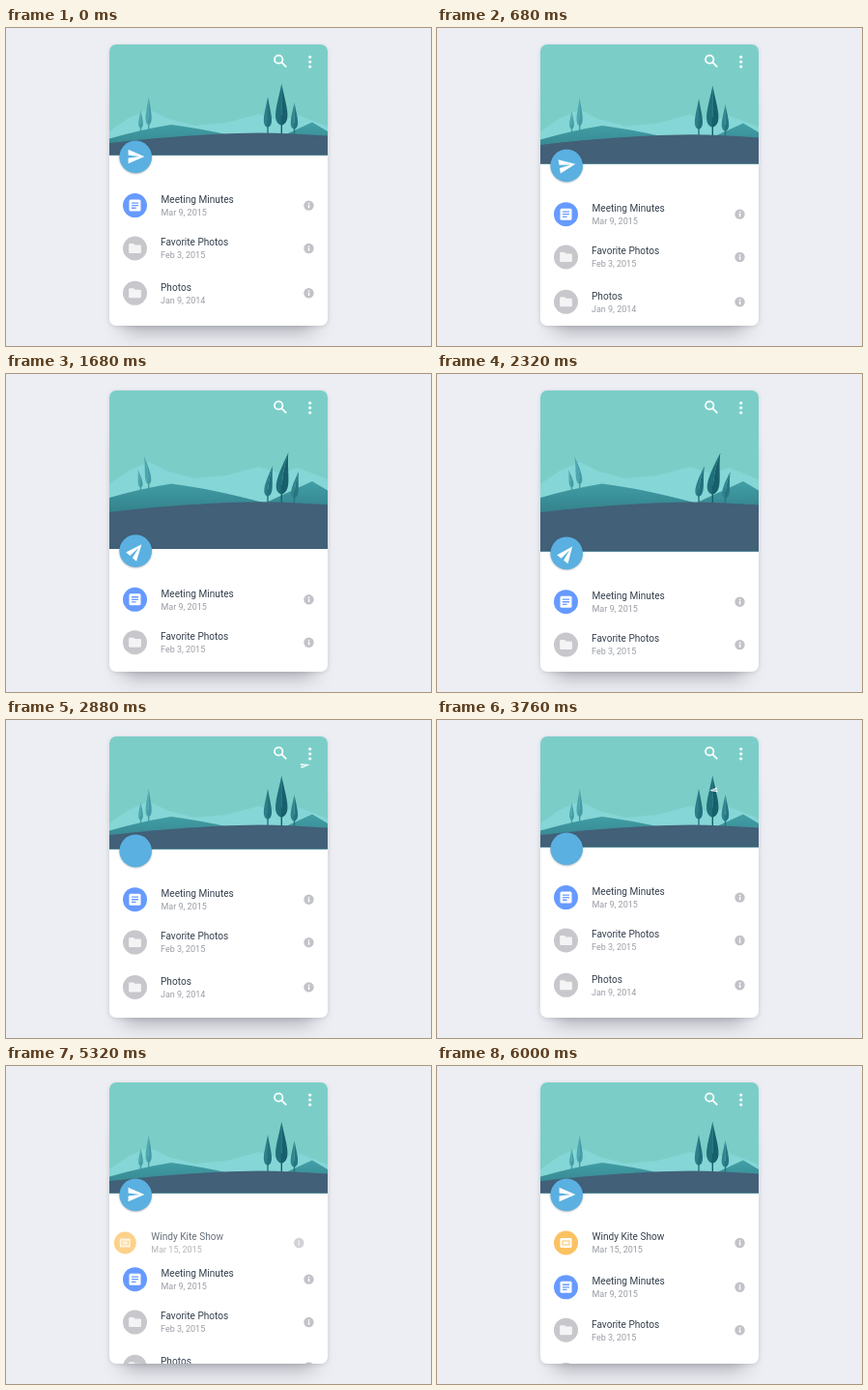
An HTML page with a canvas for the animation above (7000 ms loop, 440 px wide and 329 px high).

```html
<!DOCTYPE html>
<html lang="en">
<head>
<meta charset="utf-8">
<title>Pull to refresh</title>
<style>
html, body { margin: 0; width: 100%; height: 100%; overflow: hidden; background: #edeef3; }
canvas { display: block; width: 440px; height: 329px; }
</style>
</head>
<body>
<canvas></canvas>
<script>
const LOOP = 7000, MAX_PULL = 53.2, RELEASE = 2440;
const canvas = document.querySelector('canvas');
const ctx = canvas.getContext('2d');
const ratio = window.devicePixelRatio || 1;
canvas.width = 440 * ratio;
canvas.height = 329 * ratio;

const clamp = v => Math.max(0, Math.min(1, v));
const span = (t, from, to) => clamp((t - from) / (to - from));
const smooth = v => v * v * (3 - 2 * v);
const easeOut = v => 1 - (1 - v) ** 3;
const mix = (a, b, v) => a + (b - a) * v;

function pullAt(t) {
  if (t < 360) return 0;
  const drag = time => MAX_PULL * (1 - 1 / (1 + ((time - 360) / 545) ** 3));
  return t < RELEASE ? drag(t) : drag(RELEASE) * (1 - span(t, RELEASE, 3110)) ** 3;
}

function at(x, y, draw, scaleX = 1, scaleY = scaleX, angle = 0) {
  ctx.save();
  ctx.translate(x, y);
  ctx.rotate(angle);
  ctx.scale(scaleX, scaleY);
  draw();
  ctx.restore();
}

function disc(x, y, r, color) {
  ctx.fillStyle = color;
  ctx.beginPath();
  ctx.arc(x, y, r, 0, 7);
  ctx.fill();
}

function box(x, y, w, h, r, color) {
  ctx.fillStyle = color;
  ctx.beginPath();
  ctx.roundRect(x, y, w, h, r);
  ctx.fill();
}

function label(text, x, y, size, color) {
  ctx.font = `${size}px Roboto, sans-serif`;
  ctx.fillStyle = color;
  ctx.fillText(text, x, y);
}

function withShadow(color, y, blur, draw) {
  ctx.save();
  ctx.shadowColor = color;
  ctx.shadowOffsetY = y * ratio;
  ctx.shadowBlur = blur * ratio;
  draw();
  ctx.restore();
}

function fillPath(d, color) {
  ctx.fillStyle = color;
  ctx.fill(new Path2D(d));
}

// Landscape

function layer(d, offset, color) {
  at(0, offset, () => fillPath(d, color));
}

function tree(x, base, height, width, bend, light, dark) {
  const tip = base - height, foot = base - height * 0.16, lean = bend * height;
  const mid = mix(foot, tip, 0.5), low = mix(foot, tip, 0.08);
  const half = (side, color) => fillPath(
    `M${x + lean} ${tip} C${x + lean * 0.15 + side * width * 0.6} ${mid},
     ${x + side * width * 1.65} ${low}, ${x} ${foot}
     Q${x} ${mid} ${x + lean} ${tip}Z`, color);
  half(-1, light);
  half(1, dark);
  ctx.fillStyle = dark;
  ctx.fillRect(x - 0.7, foot - height * 0.2, 1.4, height * 0.4);
}

function landscape(pull) {
  const k = smooth(clamp(pull / 52.5));
  const bend = 0.16 * (pull / 52.5) ** 3;
  ctx.save();
  ctx.beginPath();
  ctx.rect(107, 17, 226, 114.4 + pull);
  ctx.clip();
  ctx.fillStyle = '#7bcec8';
  ctx.fillRect(107, 17, 226, 180);

  layer('M107 107L127 93 148 84 168 94 195 101 228 98 262 89 284 96 302 90 333 102V200H107Z',
    7 * k, '#85d6d6');
  tree(147.7, 106 + 14 * k, 35, 3.5, -bend, '#4ea5ad', '#459ba5');
  tree(139.5, 107 + 14 * k, 22, 2.7, -bend, '#4ea5ad', '#459ba5');

  const hills = ctx.createLinearGradient(0, 97, 0, 126);
  hills.addColorStop(0, '#429fa6');
  hills.addColorStop(1, '#35858f');
  layer('M107 114.5Q140 105 171 100Q212 105 268 120L317 97.5L333 107V200H107Z',
    13.5 * k, hills);

  const ground = 24 * k;
  tree(271, 109 + ground, 38, 4.6, bend, '#2b7f89', '#22717c');
  tree(298.5, 110 + ground, 33, 4.2, bend, '#2f848e', '#267681');
  tree(285.3, 109 + ground, 51.5, 7, bend, '#20707b', '#175f6b');
  layer('M107 119C150 114 205 109.2 262 108.4C285 108.4 310 109.8 333 111.5V220H107Z',
    ground, '#426078');
  ctx.restore();
}

function toolbar() {
  ctx.strokeStyle = '#fff';
  ctx.lineWidth = 1.8;
  ctx.beginPath();
  ctx.arc(282.2, 32.5, 4.2, 0, 7);
  ctx.moveTo(285.4, 35.7);
  ctx.lineTo(290.2, 40.4);
  ctx.stroke();
  for (const y of [30, 35, 40]) disc(314.7, y, 1.6, '#fff');
}

// List

const icons = {
  doc: ['#669aff', color => {
    box(-6, -6, 12, 12, 1.5, '#fff');
    [[-3.2, 7], [-0.6, 7], [2, 4.6]].forEach(([y, w]) => box(-3.5, y, w, 1.3, 0, color));
  }],
  folder: ['#c7c7cc', () =>
    fillPath('M-5.3 -5H-1.4L0 -3.6H5.2Q6.4 -3.6 6.4 -2.4V3.9Q6.4 5 5.2 5H-5.2Q-6.4 5 -6.4 3.9V-3.9Q-6.4 -5 -5.3 -5Z', '#f4f4f5')],
  slides: ['#fbc262', color => {
    box(-6, -5, 12, 10, 1.3, '#fff');
    box(-4, -2.4, 8, 4.8, 0, color);
    box(-3, -1.5, 6, 3, 0, '#fff');
  }]
};

function row(title, date, kind, x, y, iconScale = 1) {
  const [color, drawIcon] = icons[kind];
  at(133.5, y, () => {
    disc(0, 0, 12.5, color);
    drawIcon(color);
  }, iconScale);
  label(title, x, y - 2.6, 10.1, '#35404e');
  label(date, x, y + 10.4, 9, '#9a9da4');
  disc(313.5, y, 5.2, '#c2c3c8');
  ctx.fillStyle = '#fff';
  ctx.fillRect(312.8, y - 2.8, 1.5, 1.4);
  ctx.fillRect(312.8, y - 0.7, 1.5, 3.4);
}

function list(t, pull) {
  const shift = pull + 45.2 * smooth(span(t, 5000, 5440));
  row('Meeting Minutes', 'Mar 9, 2015', 'doc', 160.5, 183.6 + shift);
  row('Favorite Photos', 'Feb 3, 2015', 'folder', 160, 228 + shift);
  row('Photos', 'Jan 9, 2014', 'folder', 160, 274.3 + shift);

  const entry = easeOut(span(t, 5160, 5600));
  if (!entry) return;
  const pop = span(t, 5200, 6000);
  const iconScale = 1 - Math.exp(-5 * pop) * Math.cos(9 * pop) * (1 - pop);
  ctx.save();
  ctx.globalAlpha = entry;
  ctx.translate(-40 * (1 - entry), 0);
  row('Windy Kite Show', 'Mar 15, 2015', 'slides', 160.5, 183, iconScale);
  ctx.restore();
}

// Paper plane

function plane(x, y, scale, angle, flatness = 1) {
  at(x, y, () => fillPath('M-10.5 9L10.5 0L-10.5 -9V-2L4.5 0L-10.5 2Z', '#fff'),
    0.8 * scale, 0.8 * scale * flatness, angle);
}

function flyAlong([x0, y0, x1, y1, x2, y2], s, scale, flatness) {
  const point = (a, b, c) => mix(mix(a, b, s), mix(b, c, s), s);
  const slope = (a, b, c) => mix(b - a, c - b, s);
  plane(point(x0, x1, x2), point(y0, y1, y2), scale,
    Math.atan2(slope(y0, y1, y2), slope(x0, x1, x2)), flatness);
}

function planeAt(t, pull) {
  if (t < RELEASE) {
    plane(135, 133 + pull, 1, -pull * Math.PI / 180);
  } else if (t < 2980) {
    const s = span(t, RELEASE, 2965);
    flyAlong([135, 185, 235, 41, 345, 44], s, mix(1, 0.5, s), mix(1, 0.5, s));
  } else if (t > 3600 && t < 4280) {
    const s = span(t, 3600, 4280);
    flyAlong([342, 69, 225, 72, 99, 112], s, mix(0.45, 0.6, s), 0.7);
  } else if (t > 4880) {
    const s = easeOut(span(t, 4880, 5360));
    plane(mix(94, 135, s), mix(129, 133, s), 1, 0.2 * (1 - s));
  }
}

function draw(t) {
  const pull = pullAt(t);
  ctx.setTransform(ratio, 0, 0, ratio, 0, 0);
  ctx.fillStyle = '#edeef3';
  ctx.fillRect(0, 0, 440, 329);

  withShadow('rgba(40, 42, 55, .36)', 10, 20, () => box(121, 60, 198, 243, 7, '#fff'));
  withShadow('rgba(60, 64, 85, .16)', 1, 4, () => box(107, 17, 226, 291, 7, '#fff'));

  ctx.save();
  ctx.beginPath();
  ctx.roundRect(107, 17, 226, 291, 7);
  ctx.clip();
  landscape(pull);
  toolbar();
  list(t, pull);
  withShadow('rgba(30, 50, 70, .4)', 0.6, 2, () => disc(134.2, 133.3 + pull, 16.8, '#5ab0e0'));
  planeAt(t, pull);
  ctx.restore();
}

function frame() {
  draw(performance.now() % LOOP);
  requestAnimationFrame(frame);
}
frame();
</script>
</body>
</html>
```
